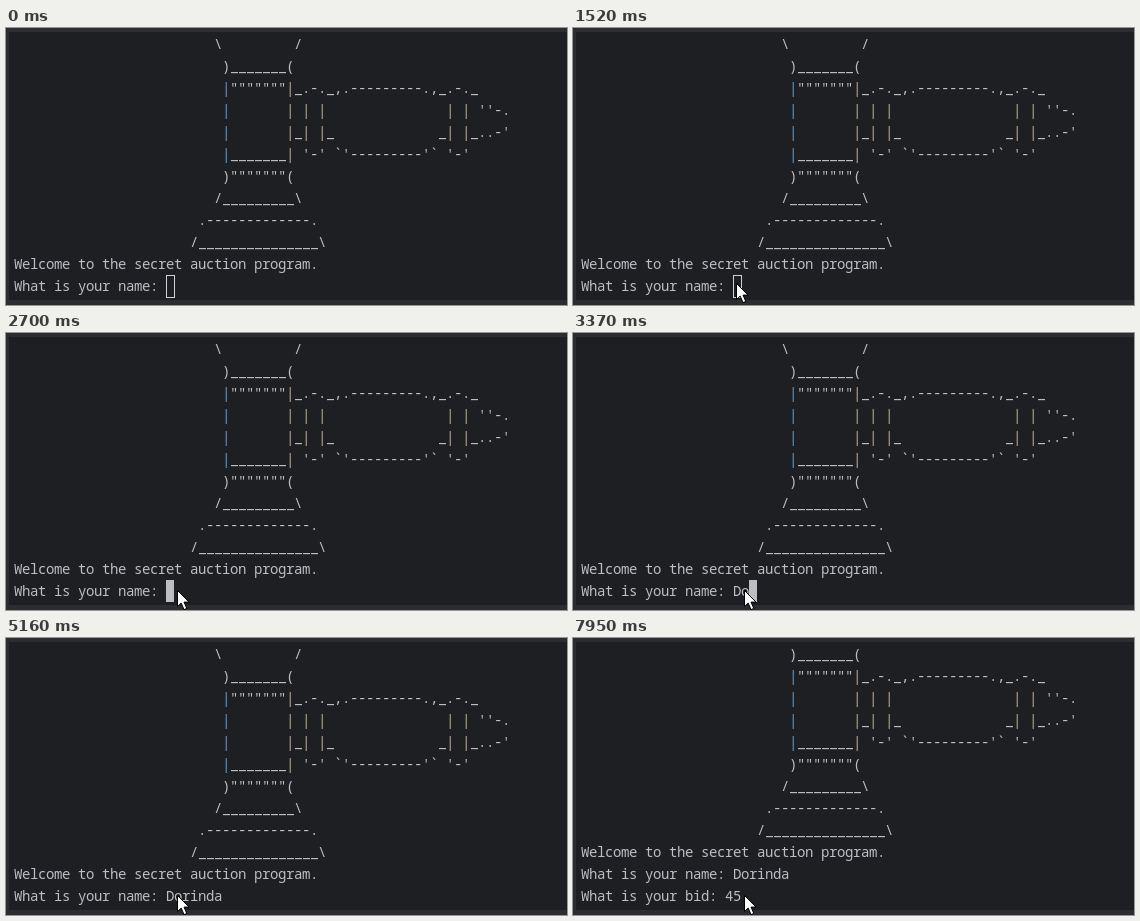
These frames come from a looping animation (561x277 px, 8 s). An HTML page:

```html
<!DOCTYPE html>
<html lang="en">
<head>
<meta charset="utf-8">
<title>Secret auction</title>
<style>
  html, body { margin: 0; width: 100%; height: 100%; overflow: hidden; background: #1e1f22; }
  #stage { position: relative; width: 561px; height: 277px; overflow: hidden; }
  .edge { position: absolute; background: #2b2d30; }
  #screen {
    position: absolute; left: 8px; top: 5px;
    font: 500 14px/22px "Noto Sans Mono", "DejaVu Sans Mono", monospace;
    letter-spacing: calc(8px - .6em); font-variant-ligatures: none;
    color: #bcbec4; white-space: pre;
  }
  .row { position: relative; height: 22px; width: 545px; }
  /* narrow gap between neighbouring cells */
  .art::after {
    content: ""; position: absolute; inset: 0;
    background: repeating-linear-gradient(90deg, #1e1f22 0 1px, transparent 1px 8px);
  }
  .bar { color: #c4ae94; }
  .bar:first-child { color: #5f9fd6; }
  #caret { position: absolute; top: 247px; width: 8px; height: 22px; background: #bcbec4; }
  #caret.hollow { width: 9px; height: 23px; box-sizing: border-box; background: none; border: 1px solid #ced0d6; }
  #mouse { position: absolute; left: 0; top: 0; overflow: visible; }
</style>
</head>
<body>
<div id="stage">
  <div class="edge" style="left:0;top:0;width:561px;height:4px"></div>
  <div class="edge" style="left:0;top:0;width:3px;height:277px"></div>
  <div class="edge" style="left:0;top:272px;width:561px;height:5px"></div>
  <div id="screen"></div>
  <div id="caret"></div>
  <svg id="mouse" width="13" height="21">
    <path d="M.5 .5V16.6L4.2 13.1L7 19.6L9.8 18.4L7 12.1H12Z" fill="#fff" stroke="#000"/>
  </svg>
</div>
<script>
const LOOP = 8000, ROWS = 12, CELL = 8, LEFT = 8, STEP = 70;
const NAME = "Dorinda", BID = "45";
const FOCUS = 1900, ENTER = 5420;

const art = String.raw`
                         \         /
                          )_______(
                          |"""""""|_.-._,.---------.,_.-._
                          |       | | |               | | ''-.
                          |       |_| |_             _| |_..-'
                          |_______| '-' ${"`"}'---------'${"`"} '-'
                          )"""""""(
                         /_________\
                       .-------------.
                      /_______________\
`.split("\n").slice(1, -1);

// pointer moves, each from where the last one ended
const legs = [
  { start: 130, end: 410, to: [276, 226] },
  { start: 610, end: 750, to: [129, 250] },
  { start: 820, end: 1170, to: [152, 244] },
  { start: 1370, end: 1520, to: [164, 256] },
  { start: 1900, end: 2160, to: [171, 257] }
];
const unlit = [[2160, 2700], [5160, ENTER], [6410, 6740], [7950, LOOP]];

const $ = id => document.getElementById(id);
const screenEl = $("screen"), caret = $("caret"), mouse = $("mouse");
const clamp = (v, lo, hi) => Math.min(hi, Math.max(lo, v));

const row = (html, kind = "") => `<div class="row ${kind}">${html}</div>`;
const artRows = art.map(line => row(line.replace(/\|/g, '<span class="bar">|</span>'), "art"));

// typing speeds up along the name, and is even in the bid
function nameAt(t) {
  const p = clamp((t - 2900) / 1730, 0, 1);
  return t < 2900 ? "" : NAME.slice(0, 1 + Math.floor(p ** 1.35 * (NAME.length - 1)));
}
const bidAt = t => BID.slice(0, clamp(1 + Math.floor((t - 6740) / 200), 0, BID.length));

function pointerAt(t) {
  let [x, y] = [499, 277];
  for (const { start, end, to } of legs) {
    if (t < start) break;
    const steps = Math.floor((t - start) / STEP) + 1;
    const p = Math.min(1, steps * STEP / (end - start + STEP));
    x += (to[0] - x) * p;
    y += (to[1] - y) * p;
  }
  return [Math.round(x), Math.round(y)];
}

let shown = "";
function draw(t) {
  const lines = ["Welcome to the secret auction program.", "What is your name: " + nameAt(t)];
  if (t >= ENTER) lines.push("What is your bid: " + bidAt(t));
  const html = [...artRows, ...lines.map(line => row(line))].slice(-ROWS).join("");
  if (html !== shown) screenEl.innerHTML = shown = html;

  caret.className = t < FOCUS ? "hollow" : "";
  caret.style.left = LEFT + CELL * lines[lines.length - 1].length + "px";
  caret.hidden = unlit.some(([from, to]) => t >= from && t < to);

  const [x, y] = pointerAt(t);
  mouse.style.transform = `translate(${x}px, ${y}px)`;
}

const start = performance.now();
function tick() {
  draw((performance.now() - start) % LOOP);
  requestAnimationFrame(tick);
}
tick();
</script>
</body>
</html>
```
